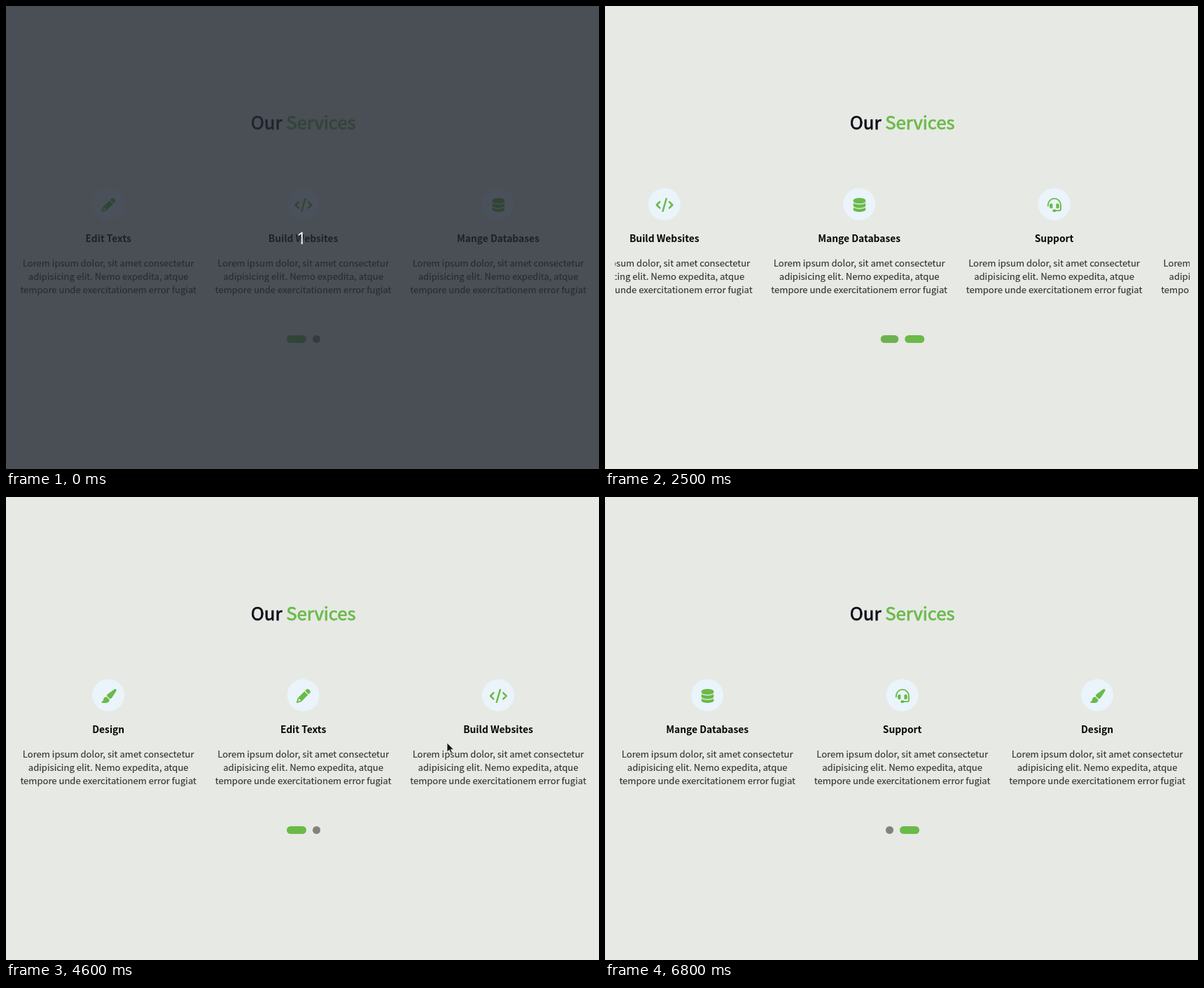
Animation, 847 px wide and 661 px high, one loop 8000 ms. Source, as an HTML page:

```html
<!DOCTYPE html>
<html lang="en">
<head>
<meta charset="utf-8">
<title>Our Services</title>
<style>
  html, body { margin: 0; width: 100%; height: 100%; overflow: hidden; background: #e7e9e4; }
  svg { display: block; width: 847px; height: 661px; }
  text { font-family: "Noto Sans CJK JP", "Noto Sans CJK SC", "Noto Sans CJK", sans-serif; text-anchor: middle; }
  .heading { font-size: 25.7px; fill: #0f0f1c; stroke: #0f0f1c; stroke-width: .75; }
  .heading tspan { fill: #6aba49; stroke: #6aba49; }
  .title { font-size: 13.8px; font-weight: 700; fill: #050505; }
  .copy { font-size: 13.05px; fill: #333; stroke: #333; stroke-width: .12; }
  .icon { fill: #6aba49; stroke: #6aba49; stroke-width: 0; stroke-linecap: round; stroke-linejoin: round; }
  .icon .line { fill: none; }
  #count { font: 24px "Open Sans", sans-serif; fill: #fff; }
</style>
</head>
<body>
<svg viewBox="0 0 847 661">
  <defs>
    <clipPath id="window"><rect x="14.5" y="200" width="820.5" height="260"/></clipPath>
    <g id="pencil" transform="translate(-256 -256)">
      <path fill-rule="evenodd" d="M292 90L422 220 188 453Q172 469 151 475L31 510Q-6 516 1 481L36 360Q42 339 59 323ZM160 399H128Q112 399 112 383V351L89 361 82 374 59 452 138 429 151 422Z"/>
      <path d="M314 67L363 19Q408-19 453 19L493 59Q531 104 493 149L444 197Z"/>
    </g>
    <g id="code" transform="translate(-320 -256)">
      <path class="line" stroke-width="64" d="M384 32L256 480M496 144L608 256 496 368M144 144L32 256 144 368"/>
    </g>
    <g id="database" transform="translate(-224 -256)">
      <path d="M0 80A224 80 0 0 1 448 80V128A224 80 0 0 1 0 128Z"/>
      <path d="M0 186Q75 240 224 240T448 186V288A224 80 0 0 1 0 288Z"/>
      <path d="M0 346Q75 400 224 400T448 346V432A224 80 0 0 1 0 432Z"/>
    </g>
    <g id="headset" transform="translate(-256 -256)">
      <path class="line" stroke-width="48" d="M24 296V256A232 232 0 0 1 488 256V400A64 64 0 0 1 424 464H290"/>
      <path class="line" stroke-width="96" d="M240 464H272"/>
      <path d="M144 208H160Q192 208 192 240V352Q192 384 160 384H144Q80 384 80 320V272Q80 208 144 208ZM368 208Q432 208 432 272V320Q432 384 368 384H352Q320 384 320 352V240Q320 208 352 208Z"/>
    </g>
    <g id="brush" transform="translate(-288 -256)">
      <path d="M339 367Q382 360 407 324L568 74Q584 40 561 13 530-13 499 10L262 187Q224 217 224 263Z"/>
      <path d="M320 392L204 288A112 112 0 0 0 97 412Q96 446 69 448H64A32 32 0 0 0 64 512H208A112 112 0 0 0 320 392Z"/>
    </g>
  </defs>

  <rect width="847" height="661" fill="#e7e9e4"/>
  <text class="heading" x="424.7" y="176">Our <tspan>Services</tspan></text>
  <g clip-path="url(#window)"><g id="track"></g></g>
  <rect class="bullet" y="470" height="11" rx="5.5"/>
  <rect class="bullet" y="470" height="11" rx="5.5"/>

  <g id="cursor">
    <path id="arrow" d="M0 0V13L3.2 10.2 5.2 14.6 7.3 13.7 5.3 9.4H9.4Z" fill="#161616" stroke="#f4f4f2" stroke-width=".7"/>
    <g id="hand" fill="#fff" stroke="#222" stroke-linejoin="round">
      <path d="M-1.4 8V1.2Q-1.4-.2 0-.2T1.4 1.2V4.8Q2.8 4 4 5.2 5.5 4.6 6.3 5.9 8 5.5 8 7.4V9.5L6.8 13.2H.4L-4.2 8.4Q-4.4 6.4-2.8 6.8Z"/>
      <path d="M1.4 4.8V7.5M4 5.2V7.8M6.3 5.9V8" stroke-width=".6"/>
    </g>
  </g>

  <g id="overlay">
    <rect width="847" height="661" fill="rgb(36,40,50)" opacity=".8"/>
    <text id="count" x="422" y="340">1</text>
  </g>
</svg>
<script>
const LOOP = 8000, TICK = 100;
const STEP = 278.4, FIRST = 146.2, SLIDE_MS = 300;
const GREEN = [106, 186, 73], GREY = [130, 130, 127];
const $ = id => document.getElementById(id);

const services = [
  ['pencil', 'Edit Texts'], ['code', 'Build Websites'], ['database', 'Mange Databases'],
  ['headset', 'Support'], ['brush', 'Design']
];
const copy = ['Lorem ipsum dolor, sit amet consectetur', 'adipisicing elit. Nemo expedita, atque',
  'tempore unde exercitationem error fugiat'];

const card = i => {
  const [icon, title] = services[i % services.length];
  return `<g transform="translate(${FIRST + i * STEP} 0)">
    <circle cy="283" r="23" fill="#eaf4fa"/>
    <g class="icon" transform="translate(.3 284) scale(.0391)">${$(icon).outerHTML.replace(/ id="\w+"/, '')}</g>
    <text class="title" y="337">${title}</text>
    ${copy.map((line, n) => `<text class="copy" y="${372 + n * 19}">${line}</text>`).join('')}
  </g>`;
};
$('track').innerHTML = Array.from({ length: 11 }, (_, i) => card(i)).join('');

const clamp = v => Math.max(0, Math.min(1, v));
const mix = (a, b, u) => a + (b - a) * u;
const smooth = u => u * u * (3 - 2 * u);

// The CSS "ease" curve, solved by bisection.
const ease = x => {
  let lo = 0, hi = 1, s;
  for (let i = 0; i < 20; i++) {
    s = (lo + hi) / 2;
    const bx = .75 * s * (1 - s) + s ** 3;
    bx < x ? lo = s : hi = s;
  }
  return .3 * s * (1 - s) ** 2 + 3 * s * s * (1 - s) + s ** 3;
};

// Places where the pointer turns: [time, x, y]
const turns = [
  [3200, 713, 381], [3400, 589, 362], [3500, 613, 359], [3600, 613, 359], [3900, 225, 372],
  [4300, 622, 353], [4600, 630, 351], [5000, 221.5, 371], [5200, 255, 437], [5600, 400, 512],
  [6000, 446, 477], [6200, 445, 476], [6500, 639, 109], [6700, 669, 64]
];
function pointer(t) {
  const next = turns.findIndex(turn => turn[0] > t);
  if (next < 1) return turns[next ? turns.length - 1 : 0].slice(1);
  const [t0, x0, y0] = turns[next - 1], [t1, x1, y1] = turns[next];
  const u = smooth((t - t0) / (t1 - t0));
  return [mix(x0, x1, u), mix(y0, y1, u)];
}

// Each move settles on card `to` from time `at`; a drag first follows the pointer from `grab`.
const moves = [
  { at: 400, to: 1 }, { at: 2450, to: 2 }, { grab: 3600, at: 3900, to: 4 },
  { grab: 4600, at: 5000, to: 6 }, { at: 6010, to: 7 }
];
const THRESHOLD = 8;

function position(t) {
  let p = 0;
  for (const { grab, at, to } of moves) {
    if (grab < t) {
      const pulled = pointer(grab)[0] - pointer(Math.min(t, at))[0] - THRESHOLD;
      p += Math.max(0, pulled) / STEP;
    }
    p = mix(p, to, ease(clamp((t - at) / SLIDE_MS)));
  }
  return p;
}

const bullets = document.querySelectorAll('.bullet');
const page = move => move && move.to % services.length === 2 ? 1 : 0;

function drawBullets(t) {
  const done = moves.filter(move => move.at <= t);
  const last = done.pop(), active = page(last);
  const u = active === page(done.pop()) ? 1 : clamp((t - last.at) / 350);
  const widths = [0, 1].map(i => i === active ? 28 : mix(28, 11, u));
  let x = 425 - (widths[0] + widths[1] + 9) / 2;
  bullets.forEach((bullet, i) => {
    const color = GREEN.map((c, n) => Math.round(i === active ? c : mix(c, GREY[n], u)));
    bullet.setAttribute('x', x);
    bullet.setAttribute('width', widths[i]);
    bullet.setAttribute('fill', `rgb(${color})`);
    x += widths[i] + 9;
  });
}

const show = (id, on) => $(id).setAttribute('visibility', on ? 'visible' : 'hidden');

function draw(now) {
  const t = Math.floor(now % LOOP / TICK) * TICK;
  $('track').setAttribute('transform', `translate(${-position(t) * STEP} 0)`);
  drawBullets(t);

  const [x, y] = pointer(t);
  const present = t >= 3200 && t < 6800;
  const onBullet = x > 420 && x < 456 && y > 469 && y < 483;
  $('cursor').setAttribute('transform', `translate(${x} ${y})`);
  show('arrow', present && !onBullet);
  show('hand', present && onBullet);
  show('overlay', t < TICK);
  requestAnimationFrame(draw);
}
requestAnimationFrame(draw);
</script>
</body>
</html>
```
